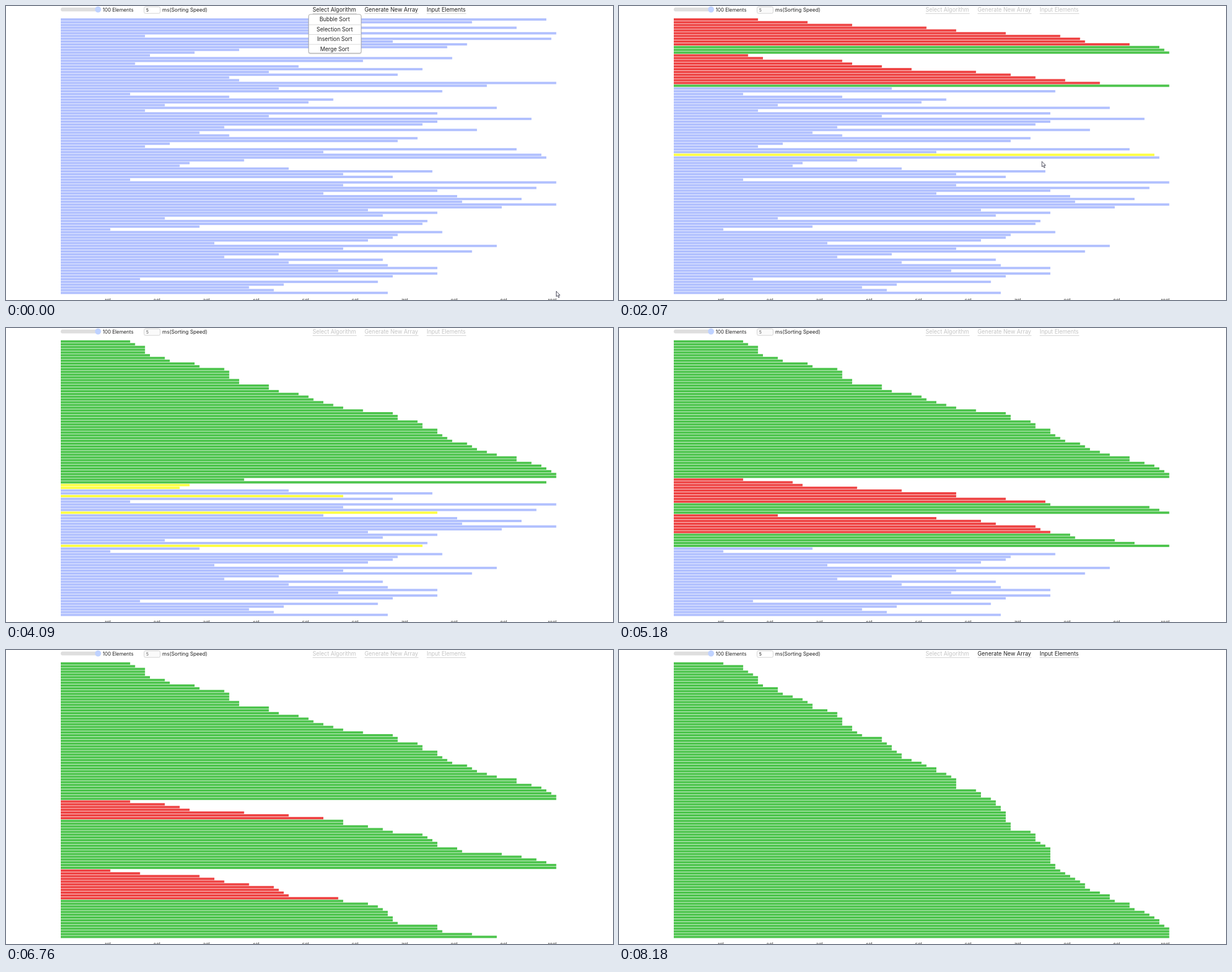
These frames come from a looping animation (1075x521 px, 8.36 s). An HTML page:

```html
<!DOCTYPE html>
<html lang="en">
<head>
<meta charset="utf-8">
<title>Merge Sort Visualizer</title>
<style>
html, body { margin: 0; width: 100%; height: 100%; overflow: hidden; background: #fff; }
svg { display: block; width: 100%; height: 100%; font-family: Inter, sans-serif; }
</style>
</head>
<body>
<svg id="stage" viewBox="0 0 1075 521" xmlns="http://www.w3.org/2000/svg">
  <rect width="1075" height="521" fill="#fff"/>
  <g id="bars"></g>
  <g id="axis" font-size="8" fill="#333" text-anchor="end"></g>
  <rect x="97" y="2.8" width="71" height="6.8" rx="3.4" fill="#dedede"/>
  <circle cx="163" cy="6.1" r="5.4" fill="#bfd2ff"/>
  <g font-size="8.7" fill="#222">
    <text x="171.3" y="9.8">100 Elements</text>
    <text x="276.8" y="9.8" font-size="9">ms(Sorting Speed)</text>
  </g>
  <rect id="field" x="244.5" y="1.5" width="28.5" height="11.6" rx="2.5" fill="#fff" stroke="#ccc" stroke-width=".9"/>
  <text id="speed" x="248" y="10" font-size="7.8">5</text>
  <g id="links" font-size="9.9"></g>
  <g id="menu" font-size="9.7" fill="#222" text-anchor="middle">
    <rect x="535" y="15.5" width="95" height="70" rx="4" fill="#000" opacity=".12"/>
    <rect x="536" y="14.8" width="93" height="68.8" rx="3" fill="#fff" stroke="#aaa" stroke-width="1"/>
  </g>
  <path id="cursor" d="M0 0V9.4L2.2 7.5L3.9 11.2L5.5 10.5L3.9 6.9H6.6Z" fill="#fff" stroke="#334" stroke-width=".9" stroke-linejoin="round"/>
</svg>
<script>
const LOOP = 8360, CLICK = 790, DONE = 8180;
const BLUE = '#b1c0fe', YELLOW = '#ffff44', RED = '#ee4444', GREEN = '#4dc44d';
const DARK = '#222', DIM = '#c4c4c4';
const LEFT = 97, UNIT = 8.775, PITCH = 4.894;

const values = [
  98, 83, 51, 92, 57, 100, 17, 99, 67, 82, 78, 36, 27, 18, 79, 61, 15, 48, 73, 42,
  68, 34, 36, 100, 86, 44, 77, 14, 34, 55, 50, 21, 88, 17, 76, 42, 95, 76, 73, 33,
  84, 28, 34, 72, 68, 22, 17, 92, 53, 97, 98, 37, 26, 24, 46, 75, 57, 67, 14, 100,
  57, 96, 76, 53, 80, 93, 81, 100, 89, 62, 76, 65, 21, 74, 73, 28, 10, 77, 68, 67,
  62, 31, 88, 57, 83, 44, 33, 65, 46, 66, 76, 56, 76, 67, 16, 64, 45, 38, 43, 66
];

// Screen refreshes: first time, last time, count
const bursts = [
  [30, 650, 15], [790, 1620, 17], [1670, 2470, 17], [2520, 3320, 17], [3370, 4190, 17],
  [4240, 5030, 17], [5080, 5870, 17], [5920, 6710, 16], [6760, 7580, 18], [7630, 8180, 12]
];
const pace = [[892, 0], [2070, 233], [3270, 471], [4090, 633], [5180, 849], [6760, 1161], [8180, 1443]];
const path = [
  [0, 974.5, 505.5], [650, 569.5, 76], [900, 569.5, 76],
  [1500, 725, 248], [2070, 749, 275.5], [2620, 1040, 560]
];

const $ = id => document.getElementById(id);

function add(parent, tag, attrs, text) {
  const el = document.createElementNS('http://www.w3.org/2000/svg', tag);
  for (const k in attrs) el.setAttribute(k, attrs[k]);
  if (text) el.textContent = text;
  parent.appendChild(el);
  return el;
}

function put(el, name, value) {
  if (el.getAttribute(name) !== String(value)) el.setAttribute(name, value);
}

// Every sorting step as [index, colour, new value]
function record() {
  const a = values.slice(), steps = [];
  function merge(lo, mid, hi) {
    const out = [];
    let i = lo, j = mid + 1;
    while (i <= mid || j <= hi) {
      const k = j > hi || (i <= mid && a[i] < a[j]) ? i++ : j++;
      steps.push([k, RED]);
      out.push(a[k]);
    }
    out.forEach((v, n) => {
      a[lo + n] = v;
      steps.push([lo + n, GREEN, v]);
    });
  }
  function sort(lo, hi) {
    if (lo >= hi) return;
    const mid = (lo + hi) >> 1;
    steps.push([mid, YELLOW]);
    sort(lo, mid);
    sort(mid + 1, hi);
    merge(lo, mid, hi);
  }
  sort(0, a.length - 1);
  return steps;
}

function snap(t) {
  let last = 0;
  for (const [from, to, n] of bursts) {
    if (t < from) break;
    const gap = (to - from) / (n - 1);
    last = from + gap * Math.min(n - 1, Math.floor((t - from) / gap + 1e-6));
  }
  return last;
}

function along(keys, t, ease) {
  if (t <= keys[0][0]) return keys[0].slice(1);
  for (let i = 1; i < keys.length; i++) {
    const p = keys[i - 1], q = keys[i];
    if (t > q[0]) continue;
    const u = ease((t - p[0]) / (q[0] - p[0]), i);
    return p.slice(1).map((v, n) => v + (q[n + 1] - v) * u);
  }
  return keys[keys.length - 1].slice(1);
}

const linear = u => u;
const glide = (u, i) => i === path.length - 1 ? u : u * u * (3 - 2 * u);

const steps = record();
const bars = values.map((v, i) => add($('bars'), 'rect', {
  x: LEFT, y: (21.8 + i * PITCH).toFixed(2), height: 4.15
}));

for (let k = 1; k <= 10; k++) {
  const x = LEFT + k * 10 * UNIT;
  add($('axis'), 'text', { x: x - 1.5, y: 525.3 }, String(k * 10));
  add($('axis'), 'rect', { x: x - 1, y: 518, width: .9, height: 3 });
}

const links = [['Select Algorithm', 543, 78], ['Generate New Array', 635, 95.5], ['Input Elements', 745, 70]]
  .map(([label, x, w]) => {
    add($('links'), 'rect', { x, y: 13, width: w, height: 1, fill: '#d2d2d2' });
    return add($('links'), 'text', { x, y: 10 }, label);
  });

['Bubble Sort', 'Selection Sort', 'Insertion Sort', 'Merge Sort'].forEach((label, i) => {
  add($('menu'), 'text', { x: 582, y: 27.4 + i * 17.4 }, label);
  if (i) add($('menu'), 'rect', { x: 537, y: 15.4 + i * 17.4, width: 91, height: .8, fill: '#ccc' });
});

function draw(time) {
  const t = snap(time);
  const busy = t >= CLICK && t < DONE;

  const now = values.slice(), paint = values.map(() => BLUE);
  const count = t >= DONE ? steps.length : Math.round(along(pace, t, linear)[0]);
  for (let n = 0; n < count && n < steps.length; n++) {
    const [i, colour, v] = steps[n];
    paint[i] = colour;
    if (v) now[i] = v;
  }
  bars.forEach((bar, i) => {
    put(bar, 'width', (now[i] * UNIT).toFixed(2));
    put(bar, 'fill', paint[i]);
  });

  links.forEach((link, i) => put(link, 'fill', busy || (i === 0 && t >= DONE) ? DIM : DARK));
  put($('field'), 'fill', busy ? '#fafafa' : '#fff');
  put($('speed'), 'fill', busy ? '#666' : DARK);
  put($('menu'), 'visibility', t < CLICK ? 'visible' : 'hidden');

  const [x, y] = along(path, t, glide);
  put($('cursor'), 'transform', `translate(${x.toFixed(1)} ${y.toFixed(1)})`);
}

const start = performance.now();
function tick() {
  draw((performance.now() - start) % LOOP);
  requestAnimationFrame(tick);
}
tick();
</script>
</body>
</html>
```
